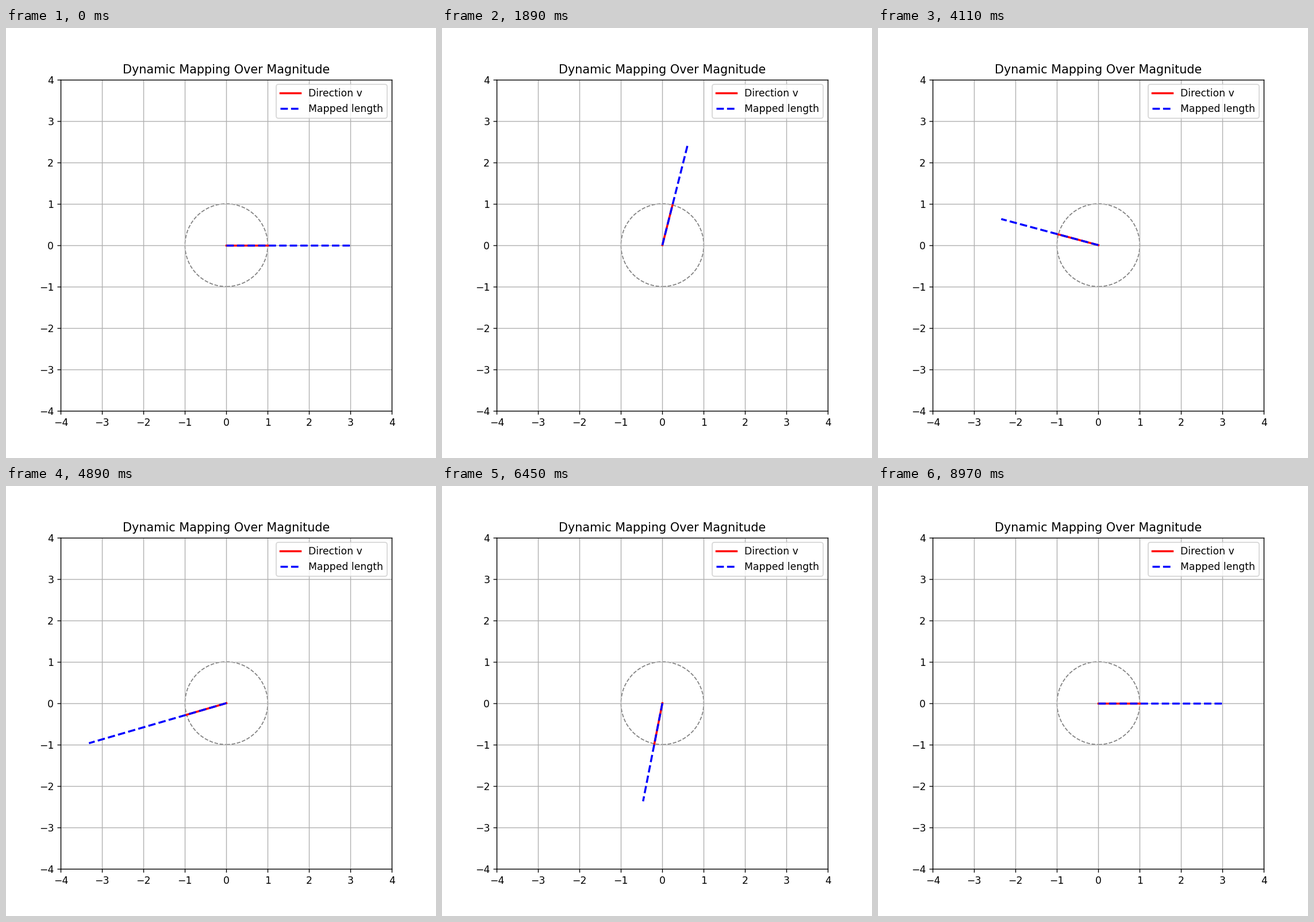
These frames come from a looping animation (748x748 px, 9000 ms). A matplotlib script:

```python
import numpy as np
import matplotlib.pyplot as plt
from matplotlib.animation import FuncAnimation

SIZE = 748
INCHES = 6
FRAMES = 300
INTERVAL = 30

A = np.array([[3, 1], [1, 2]])
angles = np.linspace(0, 2 * np.pi, FRAMES)

fig, ax = plt.subplots(figsize=(INCHES, INCHES), dpi=SIZE / INCHES)
ax.set_xlim(-4, 4)
ax.set_ylim(-4, 4)
ax.set_aspect("equal")
ax.grid(True)
ax.set_title("Dynamic Mapping Over Magnitude")
ax.add_patch(plt.Circle((0, 0), 1, color="gray", fill=False, linestyle="--"))

unit_line, = ax.plot([], [], "r-", lw=2, label="Direction v")
mapped_line, = ax.plot([], [], "b--", lw=2, label="Mapped length")
ax.legend(loc="upper right")


def set_tip(line, tip):
    line.set_data([0, tip[0]], [0, tip[1]])


def update(i):
    v = np.array([np.cos(angles[i]), np.sin(angles[i])])
    set_tip(unit_line, v)
    # the quadratic form v'Av scales the direction
    set_tip(mapped_line, (v @ A @ v) * v)
    return unit_line, mapped_line


anim = FuncAnimation(fig, update, frames=FRAMES, interval=INTERVAL,
                     blit=True, repeat=True, repeat_delay=0)
plt.show()
```
